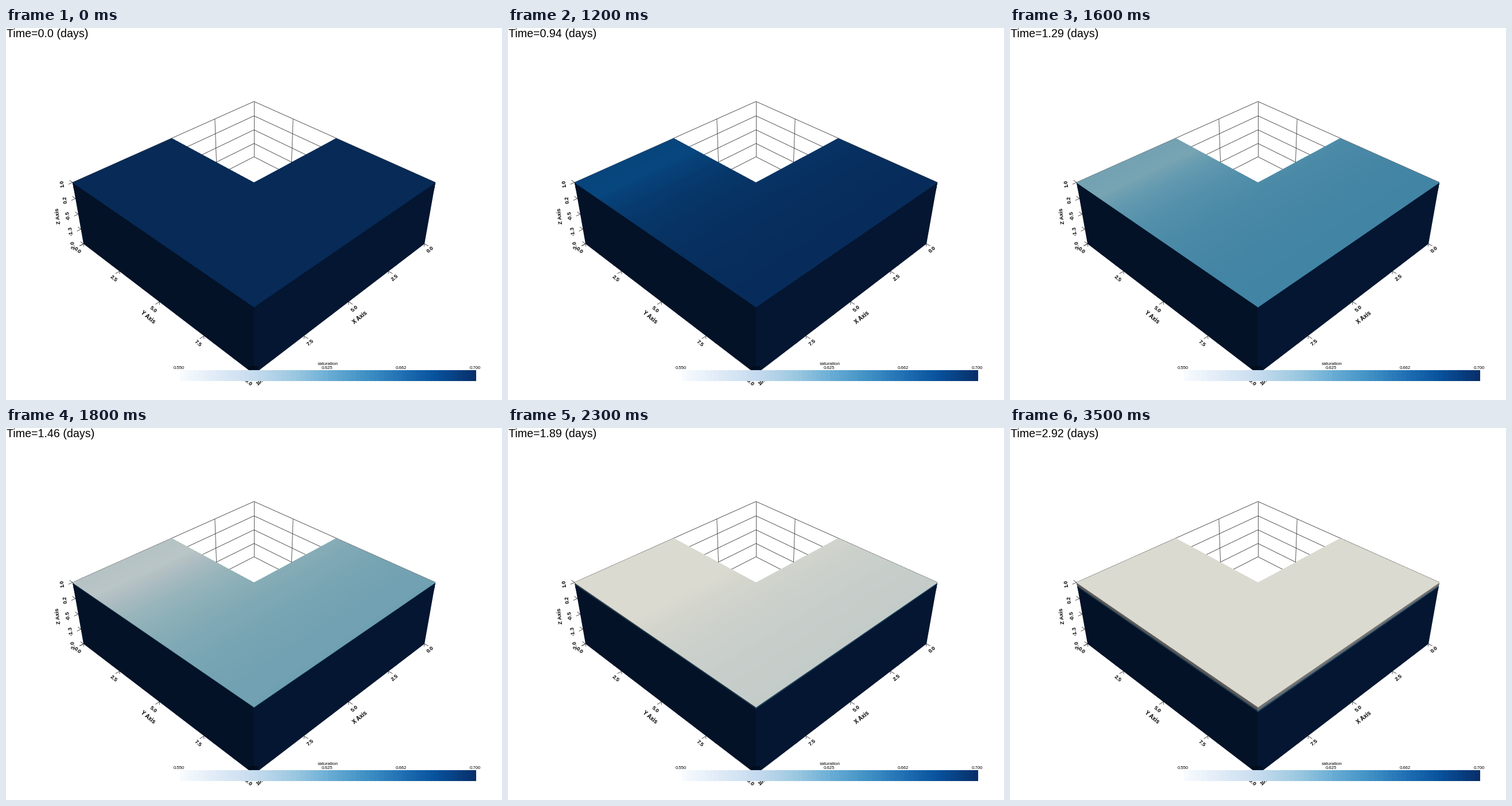
Recreate the animation shown at these times as a matplotlib script. Size 864 by 648 pixels, loop 3700 ms.

```python
import numpy as np
import matplotlib as mpl
import matplotlib.pyplot as plt
from matplotlib.animation import FuncAnimation
from matplotlib.colors import ListedColormap
from matplotlib.patches import Polygon

W, H, DPI = 864, 648, 100
PX = 72 / DPI
STEPS = 34
DAYS_PER_STEP = 0.0859

mpl.rcParams["font.family"] = "Liberation Sans"
fig = plt.figure(figsize=(W / DPI, H / DPI), dpi=DPI, facecolor="white")
ax = fig.add_axes([0, 0, 1, 1])
ax.set_xlim(0, W)
ax.set_ylim(H, 0)
ax.set_autoscale_on(False)
ax.axis("off")


def project(x, y, z):
    """Perspective view of the 10 x 10 x 3 block, in stage pixels."""
    u = (x + y) / 10 - 1
    v = (y - x) / 10
    d = 1 - z
    w = 1 - 0.2123 * u + 0.0213 * d
    return 432 + 316 * v / w, (269 + 113.8 * u + 43.69 * d) / w


def segment(p, q, **style):
    (x0, y0), (x1, y1) = project(*p), project(*q)
    ax.plot([x0, x1], [y0, y1], solid_capstyle="butt", **style)


def label(x, y, s, size, **style):
    return ax.text(x, y, s, fontsize=size * PX, color="black", **style)


# Saturation, scaled so that the colour range is 0..1
DAYS = [0.6, 0.94, 1.12, 1.29, 1.63, 2.1, 2.32, 2.92]
LEVEL = [1.4, 1.0, 0.79, 0.61, 0.33, 0.0, -0.4, -0.9]
SPREAD = [0.05, 0.12, 0.15, 0.18, 0.37, 0.25, 0.1, 0.05]


def saturation(y, depth, t):
    near = np.where(y < 1.4, 1 - 0.06 * (1.4 - y), np.exp((1.4 - y) / 3))
    surface = np.interp(t, DAYS, LEVEL) - np.interp(t, DAYS, SPREAD) * near
    return np.clip(surface + 7.5 * depth, 0, 1)


blues = mpl.colormaps["Blues"]
ramp = blues(np.linspace(0, 1, 256))[:, :3]

# Visible outline of the block, with the notch at the back
corners = [(10, 0, 1), (5, 0, 1), (5, 5, 1), (0, 5, 1),
           (0, 10, 1), (0, 10, -2), (10, 10, -2), (10, 0, -2)]
outline = Polygon([project(*c) for c in corners], transform=ax.transData)


class Face:
    def __init__(self, x, y, z, tint, order):
        self.y, self.depth = y, 1 - z
        self.mesh = ax.pcolormesh(
            *project(x, y, z), np.ones_like(y), shading="gouraud",
            cmap=ListedColormap(ramp * np.array(tint)), vmin=0, vmax=1,
            zorder=order)
        self.mesh.set_clip_path(outline)

    def update(self, t):
        self.mesh.set_array(saturation(self.y, self.depth, t))


def top_face(x0, x1, y0, y1):
    y, x = np.meshgrid(np.linspace(y0, y1, int(y1 - y0) * 5 + 1),
                       np.linspace(x0, x1, 3), indexing="ij")
    return Face(x, y, np.ones_like(x), (0.888, 0.870, 0.815), 4)


def side_face(along_y, tint):
    rows = 1 - np.append(np.linspace(0, 0.3, 17), 3)
    z, s = np.meshgrid(rows, np.linspace(0, 10, 11), indexing="ij")
    edge = np.full_like(s, 10)
    return Face(edge if along_y else s, s if along_y else edge, z, tint, 3)


# Back grid and ticks, behind the block
grid = dict(color="0.2", lw=0.8 * PX, zorder=1)
tick = dict(color="0.2", lw=0.8 * PX, zorder=1)
z_ticks = np.linspace(1, -2, 5)
h_ticks = np.linspace(0, 10, 5)

for z in z_ticks:
    segment((0, 0, z), (10, 0, z), **grid)
    segment((0, 0, z), (0, 10, z), **grid)
    segment((10, 0, z), (10.19, 0, z), **tick)
    segment((10, 0, z), (10, -0.22, z), **tick)
segment((0, 0, -2), (0, 0, 1), **grid)
segment((2.5, 0, -2), (2.5, 0, 1), **grid)
segment((0, 2.5, -2), (0, 2.5, 1), **grid)
for h in h_ticks:
    segment((h, 10, -2), (h, 10.19, -2), **tick)
    segment((h, 10, -2), (h, 10, -2.14), **tick)
    segment((10, h, -2), (10.19, h, -2), **tick)
    segment((10, h, -2), (10, h, -2.14), **tick)

faces = [
    side_face(True, (0.38, 0.365, 0.36)),
    side_face(False, (0.47, 0.46, 0.455)),
    top_face(5, 10, 0, 10),
    top_face(0, 5, 5, 10),
]

# Axis labels
bold = dict(ha="center", va="center", weight="bold", zorder=6)
for x, y, s in [(98, 271, "1.0"), (103.5, 299, "0.2"), (108, 326, "-0.5"),
                (113, 353, "-1.3"), (117.5, 378, "-2.0")]:
    label(x, y, s, 9.2, rotation=98, **bold)
label(91, 327, "Z Axis", 9.5, rotation=97, **bold)

for dx, y, s in [(307.5, 387, "0.0"), (245, 436, "2.5"), (175.5, 490, "5.0"),
                 (98, 549, "7.5"), (11.5, 616, "10.0")]:
    label(432 - dx, y, s, 9.5, rotation=-40, **bold)
    label(432 + dx, y - 1, s, 9.5, rotation=40, **bold)
label(247.5, 504, "Y Axis", 9.8, rotation=-39, **bold)
label(616.5, 504, "X Axis", 9.8, rotation=39, **bold)

# Colour bar
ax.imshow(np.linspace(0, 1, 64)[None, :], cmap=blues, aspect="auto",
          interpolation="nearest", extent=(303, 819, 615, 596), zorder=7)
for k, s in enumerate(["0.550", "0.588", "0.625", "0.662", "0.700"]):
    label(301.3 + 129.1 * k, 593.8, s, 7.8, ha="center", va="baseline", zorder=8)
label(561, 587.3, "saturation", 8.2, ha="center", va="baseline", zorder=8)

clock = label(1, 16, "", 19.6, va="baseline", zorder=8)


def update(slot):
    # first and last states are held for two slots
    t = min(max(slot - 1, 0), STEPS) * DAYS_PER_STEP
    clock.set_text(f"Time={round(t, 2)} (days)")
    for face in faces:
        face.update(t)
    return [clock] + [face.mesh for face in faces]


anim = FuncAnimation(fig, update, frames=STEPS + 3, interval=100,
                     repeat=True, repeat_delay=0, blit=False)
plt.show()
```
